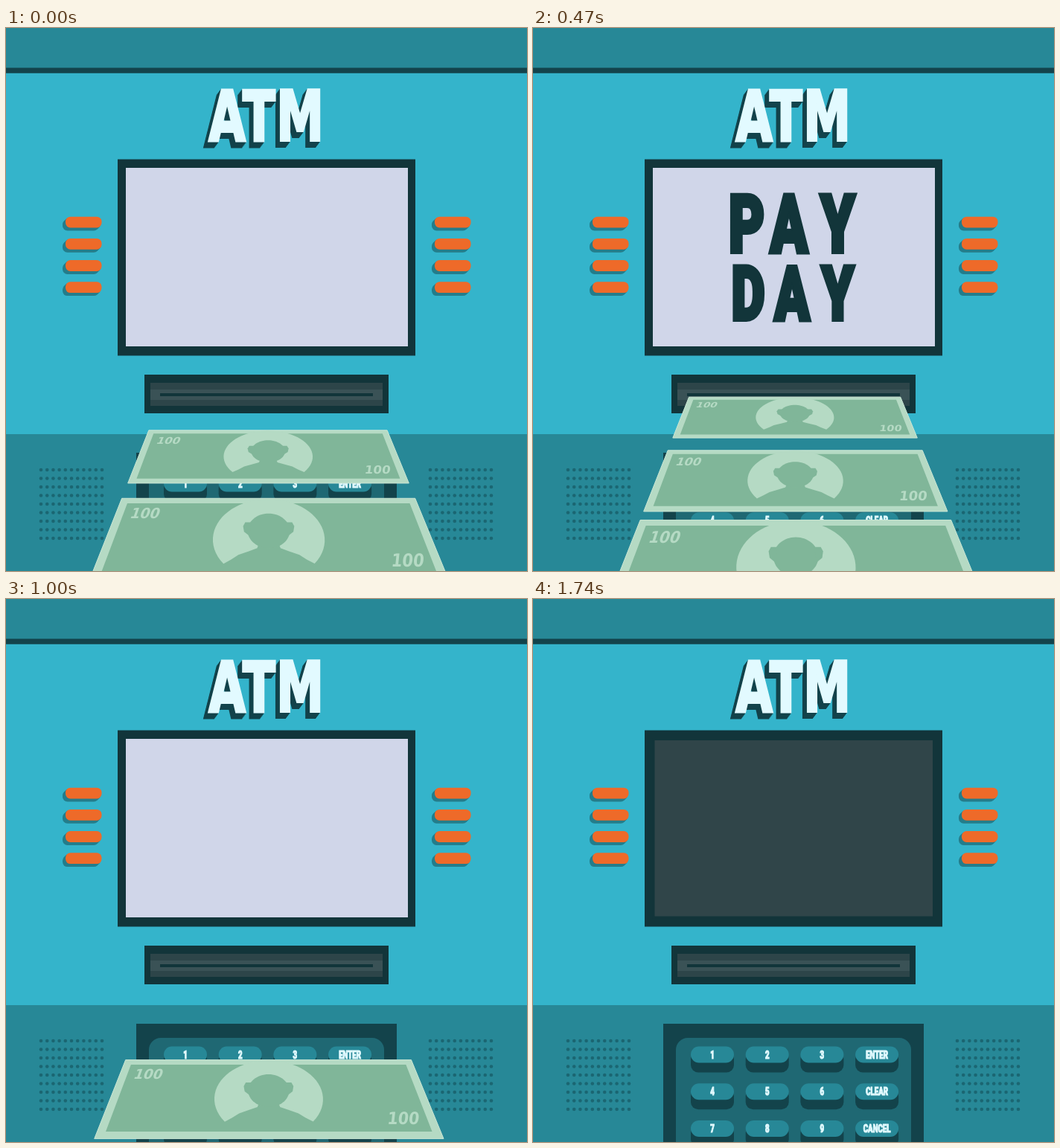
Animation of 700 by 730 pixels, one loop 2410 ms. Source, as an HTML page with a canvas:

```html
<!DOCTYPE html>
<html lang="en">
<head>
<meta charset="utf-8">
<title>ATM pay day</title>
<style>
html, body { margin: 0; height: 100%; overflow: hidden; background: #34b4cb; }
canvas { display: block; width: 100vw; height: 100vh; }
</style>
</head>
<body>
<canvas id="stage" width="700" height="730"></canvas>
<script>
const ctx = document.getElementById('stage').getContext('2d');
const LOOP = 2410, LAST = 26;
const DARK = '#12353a', TEAL = '#278897', DEEP = '#13434b', ICE = '#e2faff';
const PALE = '#b5dac4', GREEN = '#80b699';
const SANS = 'Roboto, "Liberation Sans", sans-serif', WIDE = '"DejaVu Sans", sans-serif';

function rect(color, x, y, w, h, r = 0) {
  ctx.fillStyle = color;
  ctx.beginPath();
  ctx.roundRect(x, y, w, h, r);
  ctx.fill();
}

function poly(color, points) {
  ctx.fillStyle = color;
  ctx.beginPath();
  for (const [x, y] of points) ctx.lineTo(x, y);
  ctx.closePath();
  ctx.fill();
}

// Heavy condensed lettering, centred on x
function label(text, x, y, size, color, weight, family = SANS) {
  ctx.save();
  ctx.translate(x, y);
  ctx.scale(.69, 1);
  ctx.font = `900 ${size}px ${family}`;
  ctx.textAlign = 'center';
  ctx.fillStyle = ctx.strokeStyle = color;
  ctx.lineWidth = weight;
  ctx.miterLimit = 2;
  ctx.strokeText(text, 0, 0);
  ctx.fillText(text, 0, 0);
  ctx.restore();
}

const noise = i => {
  const v = Math.sin(i * 12.9898) * 43758.5453;
  return v - Math.floor(v);
};

function title() {
  const draw = (dx, dy, color) =>
    [['A', 297], ['T', 340], ['M', 395]].forEach(([c, x]) => label(c, x + dx, 151 + dy, 92, color, 4, WIDE));
  for (let i = 8; i > 0; i--) draw(-.75 * i, i, DEEP);
  draw(0, 0, ICE);
}

function sideButtons(x) {
  for (let i = 0; i < 4; i++) {
    const y = 253.7 + 29.2 * i;
    for (let s = 4; s > 0; s--) rect('#247d8b', x - s, y + s, 48.5, 14.8, 6.5);
    rect('#ee6a29', x, y, 48.5, 14.8, 6.5);
  }
}

function speaker(x) {
  ctx.fillStyle = '#1b6672';
  for (let row = 0; row < 9; row++)
    for (let col = 0; col < 11; col++) {
      ctx.beginPath();
      ctx.arc(x + 8.2 * col, 594 + 11.5 * row, 2.3, 0, 7);
      ctx.fill();
    }
}

function keypad() {
  rect(DEEP, 175, 571, 350, 170);
  rect('#1f6873', 192, 590, 316, 160, 16);
  [['1', '2', '3', 'ENTER'], ['4', '5', '6', 'CLEAR'], ['7', '8', '9', 'CANCEL']].forEach((row, r) =>
    row.forEach((key, c) => {
      const x = 241 + 73.7 * c, y = 612.5 + 49.7 * r;
      rect(DEEP, x - 29, y - 4, 58, 28, 10);
      rect(TEAL, x - 29, y - 11, 58, 22, 11);
      label(key, x, y + 5.2, 14, ICE, 1.2);
    }));
}

const LETTERS = [
  ['P', 287, 301, 107], ['A', 344, 301, 107], ['Y', 409.5, 301, 107],
  ['D', 289, 392, 100], ['A', 348, 392, 100], ['Y', 409.5, 392, 100]
];
const payDay = () => LETTERS.forEach(l => label(...l, DARK, 6));

// Letters torn into thin strips that wander sideways
function tornText(n, amount) {
  ctx.globalAlpha = .1;
  payDay();
  ctx.globalAlpha = 1;
  LETTERS.forEach(([c, x, y, size], k) => {
    for (let i = 0; i < 50; i++) {
      const seed = n * 131 + k * 29;
      const drift = 4 * Math.sin(i * .12 + k * 2 + n) + 3 * noise(seed + i) + 4 * noise(seed + (i >> 2));
      ctx.save();
      ctx.beginPath();
      ctx.rect(x - 50, y - 98 + i * 2, 100, 2.3);
      ctx.clip();
      label(c, x + amount * (drift - 6), y - 14 * amount, size, DARK, 6);
      ctx.restore();
    }
  });
  if (amount < .6) return;
  poly(DARK, [[235, 420], [247, 416], [265, 409], [290, 407], [310, 409], [320, 415], [332, 415], [350, 415], [350, 420]]);
  poly(DARK, [[422, 415], [425, 412], [435, 412], [434, 420], [423, 420]]);
  poly(DARK, [[445, 419], [446, 411], [455, 408], [480, 411], [505, 406], [528, 406], [533, 414], [532, 420]]);
  rect(TEAL, 520, 417, 9, 3);
}

function screen(n) {
  const fade = Math.min(1, Math.max(0, (n - 18) / 6));
  rect(DARK, 150, 176.5, 400, 264);
  rect('#d0d6e9', 161, 188, 379, 240);
  if (n > 18 && n < 24) tornText(n, Math.min(1, (n - 18) / 3));
  else if (n >= 5 && n < 12 || n === 18) payDay();
  if (!fade) return;
  ctx.globalAlpha = fade;
  rect('#304549', 161, 188, 379, 240);
  ctx.globalAlpha = 1;
  if (fade === 1) {
    ctx.strokeStyle = DARK;
    ctx.lineWidth = 3;
    ctx.strokeRect(162, 188.5, 376.5, 239.5);
  }
}

function slot() {
  rect(DARK, 186, 466, 328, 52);
  rect('#2d4549', 194, 477, 312, 31);
  rect('#3a5256', 194, 486, 312, 14);
  rect(DARK, 207, 491, 286, 4);
}

// A note lies on a receding plane; depth is the inverse of height below the horizon
function bill(depth) {
  const fall = d => 1e6 / (depth - 383 * d);
  const at = (a, d) => [349 + fall(d) * (.0075 + .807 * a), 144 + fall(d)];
  const box = (a, top, bottom) => [at(-a, top), at(a, top), at(a, bottom), at(-a, bottom)];
  const oval = (cd, ra, rd) => Array.from({ length: 60 }, (_, i) =>
    at(ra * Math.cos(i * Math.PI / 30), cd + rd * Math.sin(i * Math.PI / 30)));
  const amount = (a, d, slant) => {
    const y = fall(d), [px, py] = at(a, d);
    ctx.save();
    ctx.transform(y / 500, 0, slant * y / 500, y * y / 250000, px, py);
    ctx.font = `900 18.5px ${WIDE}`;
    ctx.textAlign = 'center';
    ctx.fillStyle = PALE;
    ctx.fillText('100', 0, 7);
    ctx.restore();
  };

  poly(PALE, box(.5, 0, 1));
  ctx.strokeStyle = '#cbe7d5';
  ctx.lineWidth = 1;
  ctx.stroke();
  poly(GREEN, box(.475, .072, .925));

  // Portrait disc, with everything under the shoulders left open
  const disc = Array.from({ length: 50 }, (_, i) => {
    const q = 2.44 + i / 49 * 4.54;
    return at(.172 * Math.cos(q), .5 + .49 * Math.sin(q));
  });
  const shoulders = [[.11, .77], [.09, .72], [.06, .68], [.035, .645], [.03, .59]];
  poly(PALE, [...disc, ...shoulders.map(p => at(...p)),
    ...shoulders.slice().reverse().map(([a, d]) => at(-a, d))]);
  poly(GREEN, oval(.43, .066, .215));
  for (const side of [-1, 1])
    poly(GREEN, [[.055, .33], [.075, .33], [.081, .38], [.077, .45], [.06, .5]].map(([a, d]) => at(a * side, d)));

  amount(-.403, .21, -.35);
  amount(.405, .775, -.12);
}

const STARTS = [2048, 2520, 2958, 3385, 3865, 4300];

function bills(n) {
  ctx.save();
  ctx.beginPath();
  ctx.rect(0, 494, 700, 236);
  ctx.clip();
  for (const start of STARTS) {
    const depth = start - 146.5 * n;
    if (depth < 2900 && depth > 1690) bill(depth);
  }
  ctx.restore();
}

function draw(n) {
  rect('#34b4cb', 0, 0, 700, 730);
  rect(TEAL, 0, 0, 700, 54);
  rect(DEEP, 0, 53.5, 700, 7.3);
  rect(TEAL, 0, 546, 700, 184);
  title();
  sideButtons(80);
  sideButtons(576);
  speaker(47);
  speaker(570);
  screen(n);
  slot();
  keypad();
  bills(n);
}

// Fifteen steps a second, then a rest on the last one
const origin = performance.now();
function tick() {
  const t = Math.max(0, performance.now() - origin) % LOOP;
  draw(Math.min(LAST, Math.floor(Math.floor(t / 10) * .15 + 1e-6)));
  requestAnimationFrame(tick);
}
tick();
</script>
</body>
</html>
```
